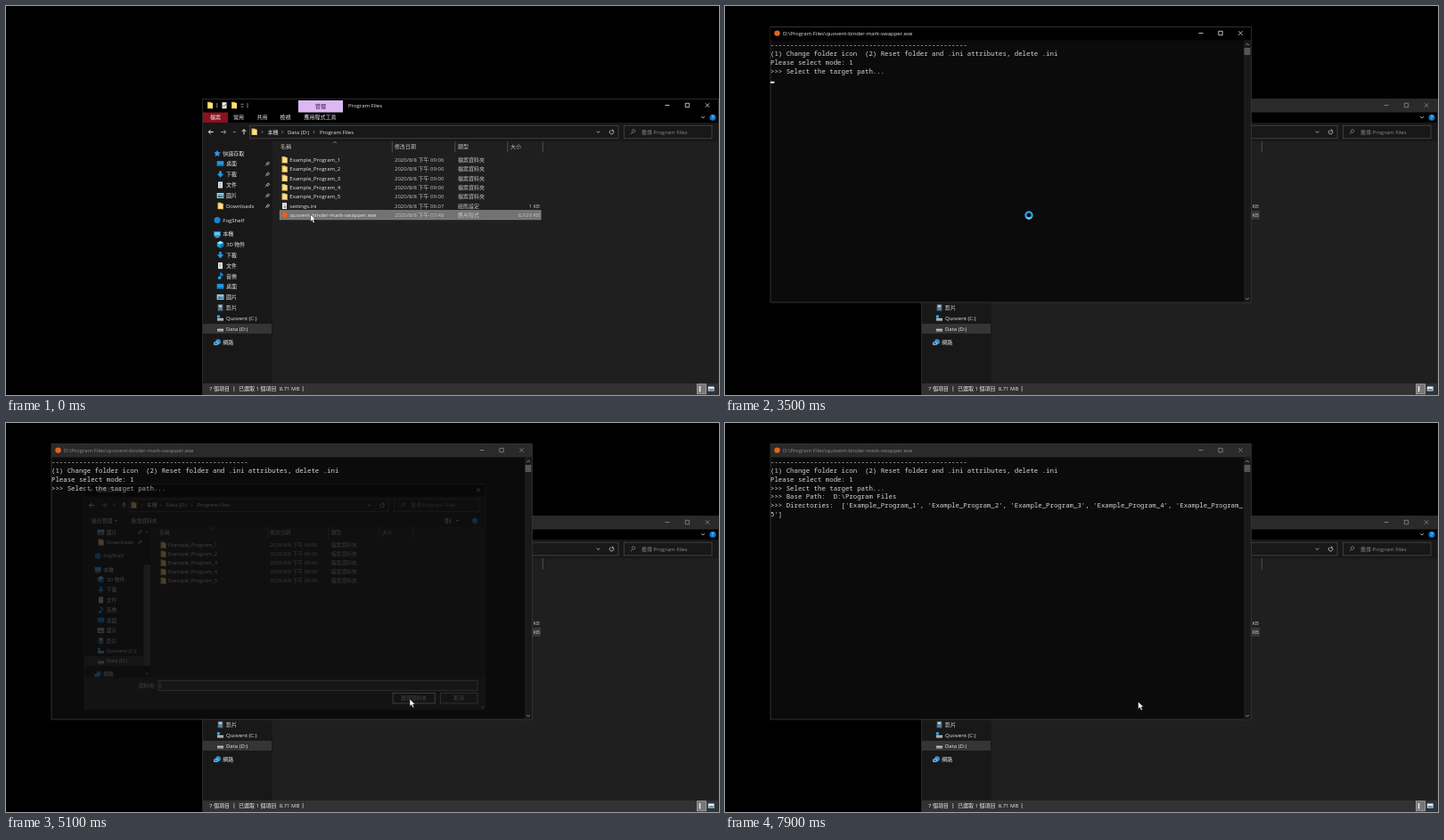
An HTML page that plays this animation: 800x437 px, repeating every 8000 ms.

```html
<!DOCTYPE html>
<html lang="zh-Hant">
<head>
<meta charset="utf-8">
<title>Folder icon tool</title>
<style>
  html, body { margin: 0; width: 100%; height: 100%; overflow: hidden; background: #000; }
  svg { display: block; width: 100%; height: 100%; }
  text { font-family: "Open Sans", "Noto Sans CJK TC", "Noto Sans CJK", sans-serif; white-space: pre; }
  .mono { font-family: "Noto Sans Mono", monospace; }
</style>
</head>
<body>
<svg id="stage" viewBox="0 0 800 437"></svg>
<script>
const LOOP = 8000, STEP = 100;
const EXE = 'quovent-binder-mark-swapper.exe';
const WHITE = '#e8e8e8', SOFT = '#c4c4c4', GREY = '#8c8c8c';
const PANE = '#191819', BODY = '#201f20', IDLE = '#2b2a2b';

// Drawing helpers; text is placed by its vertical centre
const rect = (x, y, w, h, fill, stroke) =>
  `<rect x="${x}" y="${y}" width="${w}" height="${h}" fill="${fill}"${stroke ? ` stroke="${stroke}" stroke-width=".8"` : ''}/>`;
const dot = (x, y, r, fill) => `<circle cx="${x}" cy="${y}" r="${r}" fill="${fill}"/>`;
const line = (d, color = WHITE, w = .8) => `<path d="${d}" fill="none" stroke="${color}" stroke-width="${w}"/>`;
const shape = (d, fill) => `<path d="${d}" fill="${fill}"/>`;
const text = (x, y, s, fill = WHITE, anchor = 'start') =>
  `<text x="${x}" y="${y + 2.1}" font-size="6" fill="${fill}" text-anchor="${anchor}">${s}</text>`;
const move = (x, y, s) => `<g transform="translate(${x} ${y})">${s}</g>`;
const during = (from, to, s) => `<g data-from="${from}" data-to="${to}">${s}</g>`;
const chevron = (x, y, color = WHITE, s = 1.8) => line(`M${x - s} ${y - s / 2}l${s} ${s}l${s} ${-s}`, color);
const crumb = (x, y) => line(`M${x - .7} ${y - 1.4}l1.4 1.4l-1.4 1.4`, '#aaa', .7);
const triangle = (x, y, s = 1.7) => shape(`M${x - s} ${y - s / 2}h${2 * s}l${-s} ${s}z`, '#ccc');
const help = (x, y) => dot(x, y, 3.5, '#0a7ad1') + text(x, y, '?', '#fff', 'middle');

const drive = rect(-3.5, .2, 7, 2.8, '#c9ced2') + rect(-3.5, 1.6, 7, 1.4, '#858b90');
const sheet = rect(-2.5, -3.5, 5, 7, '#eee');
const monitor = rect(-3.8, -3, 7.6, 5.4, '#1b9be6');
const ICONS = {
  folder: shape('M-3-4h3.5l1 1h1.5v6.5h-6z', '#e3b94e') + shape('M-1.8-2.6h4.8v6.4l-1.4-1h-3.4z', '#fbe08c'),
  star: shape('M0-3.8l1.1 2.6 2.8.2-2.1 1.9.7 2.8L0 2.2l-2.5 1.5.7-2.8-2.1-1.9 2.8-.2z', '#3a94dd'),
  desktop: monitor + rect(-3.8, 1.2, 7.6, 1.4, '#0d6cb0'),
  down: shape('M-1.4-3.6h2.8v3h2.4L0 3.8-3.8-.6h2.4z', '#1c9bea'),
  doc: sheet + line('M-1.5-1.5h3M-1.5 0h3M-1.5 1.5h3', '#5a8fb8', .6),
  pic: rect(-3.8, -2.9, 7.6, 5.8, '#e9f2f7') + rect(-3.2, -2.3, 6.4, 2.6, '#66b6e8') + shape('M-3.2 2.3v-1l2-2 2 1.4 2.4-1v2.6z', '#3b6f83'),
  cloud: dot(0, 0, 3.5, '#1286d8'),
  pc: monitor + rect(-3, -2.3, 6, 3.8, '#62c4f5') + rect(-2.4, 3, 4.8, .9, '#ccc'),
  cube: shape('M0-4l3.7 2v4L0 4l-3.7-2v-4z', '#1ca2dd') + shape('M0-4l3.7 2L0 0l-3.7-2z', '#9be2fa') + shape('M0 0l3.7-2v4L0 4z', '#0a77b7'),
  music: dot(-1, 2, 1.8, '#1c9bea') + line('M.4 2.2v-5.6q2.4 1 2 3.4', '#1c9bea', 1.2),
  film: rect(-2.8, -3.6, 5.6, 7.2, '#65717c') + rect(-1.6, -2.7, 3.2, 2.2, '#b6d4e6') + rect(-1.6, .5, 3.2, 2.2, '#3289c2'),
  system: drive + rect(-3.6, -3.2, 3, 3, '#23b4f0'),
  drive,
  net: dot(1, -.8, 2.9, '#2e94d4') + rect(-3.8, -.4, 4.4, 3.2, '#c4e6f8') + rect(-3.2, .2, 3.2, 2, '#1678bd'),
  ini: sheet + dot(.4, 1, 1.5, '#8b969c') + line('M-1.5-2h3', '#888', .6),
  exe: dot(0, 0, 3.2, '#e2641d')
};
const icon = (name, x, y) => move(x, y, ICONS[name]);

const buttons = (min, max, close, y, color) =>
  line(`M${min - 2.5} ${y}h5M${max - 2.2} ${y - 2.2}h4.4v4.4h-4.4zM${close - 2.2} ${y - 2.2}l4.4 4.4m0-4.4l-4.4 4.4`, color);

function addressRow(x, y, boxEnd, searchEnd) {
  const arrow = (cx, dir, color) => line(`M${cx - 2.8 * dir} ${y}h${5.6 * dir}m${-2.4 * dir}-2.4l${2.4 * dir} 2.4l${-2.4 * dir} 2.4`, color, 1);
  return arrow(x, -1, WHITE) + arrow(x + 14, 1, '#999') + chevron(x + 26.3, y, '#bbb', 1.4) +
    line(`M${x + 37} ${y + 2.8}v-5.6m-2.4 2.4l2.4-2.4l2.4 2.4`, WHITE, 1) +
    rect(x + 43.5, y - 7.3, boxEnd - x - 43.5, 14.6, PANE, '#484748') + icon('folder', x + 48.5, y) +
    crumb(x + 57.5, y) + text(x + 63.5, y, '本機') + crumb(x + 80, y) + text(x + 86, y, 'Data (D:)') +
    crumb(x + 115.5, y) + text(x + 122, y, 'Program Files') +
    chevron(boxEnd - 22.5, y, '#ccc') +
    line(`M${boxEnd - 6} ${y - 1.6}a2.3 2.3 0 1 1-2.6-.3m1.8-1.2l1 1.6l-2 .4`, '#ccc', .8) +
    rect(boxEnd + 6.5, y - 7.3, searchEnd - boxEnd - 6.5, 14.6, PANE, '#484748') +
    line(`M${boxEnd + 14} ${y + 2.4}l2-2.2a1.7 1.7 0 1 1 .3.2`, '#999', .7) +
    text(boxEnd + 26, y, '搜尋 Program Files', GREY);
}

const NAV = [
  [165.5, 'star', '快速存取', 1], [177.2, 'desktop', '桌面'], [189, 'down', '下載'], [201, 'doc', '文件'],
  [213, 'pic', '圖片'], [224.8, 'folder', 'Downloads'], [240.5, 'cloud', 'FogShelf', 1], [256.3, 'pc', '本機', 1],
  [268, 'cube', '3D 物件'], [279.8, 'down', '下載'], [291.7, 'doc', '文件'], [303.4, 'music', '音樂'],
  [315.2, 'desktop', '桌面'], [327, 'pic', '圖片'], [338.8, 'film', '影片'], [350.6, 'system', 'Quovent (C:)'],
  [362.5, 'drive', 'Data (D:)'], [378, 'net', '網路', 1]
];
const SLOW = ['doc', 'music', 'desktop', 'film', 'system', 'drive', 'net'];

function navPane(pinX, iconsAt = 0) {
  return rect(221, 357, 77, 11, '#363536') + NAV.map(([y, kind, label, top], i) => {
    const x = top ? 237 : 240.5;
    const pin = i > 0 && i < 6 ? line(`M${pinX - 2} ${y + 2.2}l2-2m-1.2-1l2.4 2.4m-1.4-1.9l1.4-1.9l1.5 1.5l-1.9 1.4`, '#bbb', .9) : '';
    let mark = icon(kind, x, y);
    if (iconsAt && SLOW.includes(kind)) {
      const blank = kind === 'system' || kind === 'drive' ? during(0, iconsAt, move(x, y, sheet)) : '';
      mark = blank + during(iconsAt, LOOP, mark);
    }
    return mark + pin + text(top ? 243.3 : 247, y, label);
  }).join('');
}

const rowY = i => 173 + i * 10.3;
const fileRow = (i, kind, name, time, type, size = '') =>
  icon(kind, 312.5, rowY(i)) + text(318.3, rowY(i), name) + text(436, rowY(i), `2020/8/8 下午 ${time}`, SOFT) +
  text(507, rowY(i), type, SOFT) + text(599, rowY(i), size, SOFT, 'end');
const rowBar = (i, fill, edge) => rect(307.3, rowY(i) - 5, 292.7, 10, fill, edge);
const selectedBar = i => rowBar(i, '#737273', '#979697');

function fileList(withSettings) {
  const heads = [[308, '名稱'], [436, '修改日期'], [507, '類型'], [566, '大小']];
  return heads.map(([x, s]) => text(x, 158.3, s, SOFT)).join('') +
    line('M433.3 152v12.5M503.8 152v12.5M562.8 152v12.5M602.3 152v12.5', '#626162', .7) +
    line('M367 154l2-1.6l2 1.6', '#aaa', .6) +
    [1, 2, 3, 4, 5].map(n => fileRow(n - 1, 'folder', `Example_Program_${n}`, n === 1 ? '09:06' : '09:00', '檔案資料夾')).join('') +
    (withSettings ? fileRow(5, 'ini', 'settings.ini', '06:07', '組態設定', '1 KB') : '');
}

function explorer() {
  const bar = (fill, tab, color) => rect(221, 105, 578, 14.5, fill) + rect(328, 106, 50, 13.5, tab) +
    text(384, 111.7, 'Program Files', color) + buttons(742, 764.5, 787, 111.5, color);
  return rect(220.5, 104.5, 579, 333, '#000', '#353435') +
    during(0, 900, bar('#000', '#dcb8f2', WHITE)) + during(900, LOOP, bar(IDLE, '#ae90ba', GREY)) +
    icon('folder', 229, 111.7) + icon('folder', 256, 111.7) + move(245, 111.7, sheet) + line('M243.3 111.5l1.3 1.5l2.2-3', '#444') +
    line('M236.8 109v5.5M271 109v5.5', '#bbb', .7) + line('M263.6 110.3h3', '#ccc', .7) + chevron(265, 113, '#ccc', 1.3) +
    text(353, 112.7, '管理', '#2c1736', 'middle') +
    rect(221, 119.5, 28, 11.5, '#8c101e') + text(235, 125.2, '檔案', WHITE, 'middle') +
    text(255, 125.2, '常用') + text(281.5, 125.2, '共用') + text(307.5, 125.2, '檢視') + text(334.5, 125.2, '應用程式工具') +
    chevron(782, 125, WHITE) + help(793, 125.2) +
    rect(221, 131, 578, 293, PANE) + addressRow(230, 141.5, 687, 792) +
    rect(299, 152, 500, 272, BODY) + navPane(293) +
    during(0, 900, selectedBar(6)) + during(900, LOOP, rowBar(6, '#373637')) +
    fileList(true) + fileRow(6, 'exe', EXE, '07:48', '應用程式', '8,929 KB') +
    rect(221, 424, 578, 13, '#333233') + text(228, 430, '7 個項目') + text(261, 430, '已選取 1 個項目  8.71 MB') +
    line('M255.8 427v6M333.2 427v6', '#ccc', .7) +
    rect(775.5, 424.8, 10, 11, '#777', '#aaa') + line('M778.5 427v6.5', WHITE, 1.6) +
    rect(787.8, 427.5, 6.8, 5, '#dff0fa') + rect(788.6, 430, 5.2, 1.7, '#3f88b5');
}

const lineY = i => 44 + i * 9.75, CELL = 4.425;
const output = (i, s) => `<text class="mono" x="51" y="${lineY(i) + 2.3}" font-size="7.375" fill="#d6d6d6">${s}</text>`;
const caret = (col, row) => rect(51 + col * CELL, lineY(row) + 1.8, CELL, 1.9, '#eee');

function terminal() {
  const bar = (fill, color) => rect(51, 24, 539, 14.5, fill) + text(65, 30.7, `D:\\Program Files\\${EXE}`, color) +
    buttons(534, 556, 578.5, 30.5, color);
  const prompt = 'Please select mode: ';
  return rect(51, 23.5, 539.3, 309.5, '#0c0b0c', '#3d3c3d') +
    during(0, 3700, bar('#000', WHITE)) + during(3700, LOOP, bar(IDLE, GREY)) + icon('exe', 58.5, 30.6) +
    rect(582, 38.5, 8, 294, '#1b1a1b') + rect(582.6, 47, 6.8, 8, '#565556') +
    line('M584.3 44l1.8-1.8l1.8 1.8M584.3 328l1.8 1.8l1.8-1.8', '#aaa', .8) +
    during(1000, 1500, caret(0, 0)) +
    during(1800, LOOP, output(0, '-'.repeat(50)) +
      output(1, '(1) Change folder icon  (2) Reset folder and .ini attributes, delete .ini')) +
    during(1800, 2600, output(2, prompt)) + during(1800, 2000, caret(20, 2)) + during(2500, 2600, caret(20, 2)) +
    during(2600, LOOP, output(2, prompt + 1)) + during(2600, 3000, caret(21, 2)) +
    during(3000, LOOP, output(3, '&gt;&gt;&gt; Select the target path...')) + during(3000, 3700, caret(0, 4)) +
    during(5400, LOOP, output(4, '&gt;&gt;&gt; Base Path:  D:\\Program Files') +
      output(5, "&gt;&gt;&gt; Directories:  ['Example_Program_1', 'Example_Program_2', 'Example_Program_3', 'Example_Program_4', 'Example_Program_") +
      output(6, "5']"));
}

function dialog(title, list, footer, viewX, iconsAt) {
  return rect(80.5, 64.5, 464.5, 261, PANE, '#3b3a3b') + rect(81, 65, 463.5, 14, '#000') +
    dot(88.3, 71.3, 2, '#3c7fc0') + text(95, 71.5, title) + line('M535 69.3l4.2 4.2m0-4.2l-4.2 4.2') +
    addressRow(89.3, 89, 433, 538) +
    text(89, 107, '組合管理') + triangle(117.5, 107) + text(135, 107, '新增資料夾') +
    line(`M${viewX - 3} 104.5h2.5v5h-2.5zM${viewX + 1} 105h2.4m-2.4 2h2.4m-2.4 2h2.4`, '#ccc', .9) + triangle(viewX + 11, 107) + help(533, 107) +
    rect(158, 114, 386.5, 175, BODY) +
    `<g clip-path="url(#navClip)">${move(-140.7, -92.7, navPane(285.2, iconsAt))}</g>` +
    rect(149.3, 115, 7.7, 173.5, '#151415') + rect(149.3, 158, 7.7, 117, '#4e4d4e') +
    line('M151.4 121.2l1.8-1.8l1.8 1.8M151.4 283.3l1.8 1.8l1.8-1.8', '#bbb', .8) +
    move(-140.5, -37.5, list) +
    rect(81, 289, 463.5, 36, '#2c2b2c') + footer +
    shape('M543.5 320.5v4h-4z', '#777');
}
const button = (x, w, label, edge) => rect(x, 306.8, w, 12, '#333233', edge) + text(x + w / 2, 313, label, WHITE, 'middle');
const field = (x, w) => rect(x, 292.6, w, 11.2, '#383738', '#a5a4a5');
const entryCaret = x => line(`M${x} 294.5v7`, WHITE, .6);

const pickFolder = dialog('選擇資料夾', fileList(false),
  text(163, 298.5, '資料夾:', WHITE, 'end') + field(166.5, 369.5) + entryCaret(168.5) +
  button(438, 48.7, '選擇資料夾', '#fff') + button(493, 43, '取消', '#bbb'), 502, 4200);

const openFile = dialog('開啟',
  during(6500, 6700, rowBar(5, '#4a494a')) + during(6700, LOOP, selectedBar(5)) + fileList(true),
  text(178.5, 298.5, '檔案名稱(N):', WHITE, 'end') + field(180.7, 256.8) + chevron(433.3, 298.5, '#ccc') +
  during(0, 6700, entryCaret(182.7)) + during(6700, LOOP, text(182.5, 298.5, 'settings.ini')) +
  field(444, 92) + text(446.5, 298.5, '組態設定檔 (*.ini)') + chevron(531.5, 298.5, '#ccc') +
  button(444, 43, '開啟(O)', '#ccc') + button(493, 43, '取消', '#bbb') +
  rect(512, 104.5, 7, 5, '#e4eef4') + rect(516, 105.5, 3, 4, '#3f9ad6'), 488, 0);

const pointer = '<g class="pointer"><path d="M0 0v8.4l1.9-1.8l1.4 3.2l1.6-.7l-1.4-3.1h2.6z" fill="#fff" stroke="#000" stroke-width=".5"/></g>';
const ring = `<circle cx="341" cy="235" r="3.6" fill="none" stroke="#2f9fe4" stroke-width="2.3"/>
  <path id="glint" d="M341 231.4a3.6 3.6 0 0 1 3.6 3.6" fill="none" stroke="#7cccf8" stroke-width="2.3"/>`;

const stage = document.getElementById('stage');
stage.innerHTML = '<clipPath id="navClip"><rect x="81" y="115" width="76" height="174"/></clipPath>' +
  explorer() + `<g id="terminal">${terminal()}</g><g id="pickFolder">${pickFolder}</g><g id="openFile">${openFile}</g>` +
  during(0, 3500, pointer) + during(3500, 3800, ring) + during(3800, LOOP, pointer);

// Opacity steps of each panel, with its centre
const fadeSteps = (opened, closed) => [[0, 0], [opened, .18], [opened + 100, .75], [opened + 200, .95], [opened + 300, 1],
  [closed, .7], [closed + 100, .25], [closed + 200, 0]];
const PANELS = [
  ['terminal', 320.5, 178, [[0, 0], [1000, .15], [1100, .75], [1200, .95], [1300, 1]]],
  ['pickFolder', 312.5, 195, fadeSteps(3800, 5000)],
  ['openFile', 312.5, 195, fadeSteps(5800, 7600)]
];
const PATH = [[0, 341.5, 234], [4300, 341.5, 234], [4800, 453, 310], [6000, 453, 310], [6500, 250, 186],
  [6800, 250, 186], [7200, 463.5, 317], [7500, 463.5, 317], [7600, 463.5, 313], [LOOP, 463.5, 313]];

const byId = id => document.getElementById(id);
const timed = [...stage.querySelectorAll('[data-from]')].map(el => [el, +el.dataset.from, +el.dataset.to]);
const pointers = stage.querySelectorAll('.pointer');

function pointerAt(t) {
  const i = PATH.findIndex(p => p[0] > t);
  const [t0, x0, y0] = PATH[i - 1], [t1, x1, y1] = PATH[i];
  const k = (t - t0) / (t1 - t0), e = k * k * (3 - 2 * k);
  return `translate(${x0 + (x1 - x0) * e} ${y0 + (y1 - y0) * e})`;
}

function render(t) {
  for (const [el, from, to] of timed) el.style.display = t >= from && t < to ? '' : 'none';
  for (const [id, cx, cy, steps] of PANELS) {
    const alpha = steps.filter(s => s[0] <= t).pop()[1], scale = .958 + .042 * alpha;
    const el = byId(id);
    el.style.display = alpha ? '' : 'none';
    el.setAttribute('opacity', alpha);
    el.setAttribute('transform', `translate(${cx} ${cy}) scale(${scale}) translate(${-cx} ${-cy})`);
  }
  for (const el of pointers) el.setAttribute('transform', pointerAt(t));
  byId('glint').setAttribute('transform', `rotate(${t * .45} 341 235)`);
}

const start = performance.now();
function tick() {
  const t = (performance.now() - start) % LOOP;
  render(Math.floor(t / STEP) * STEP);
  requestAnimationFrame(tick);
}
tick();
</script>
</body>
</html>
```
